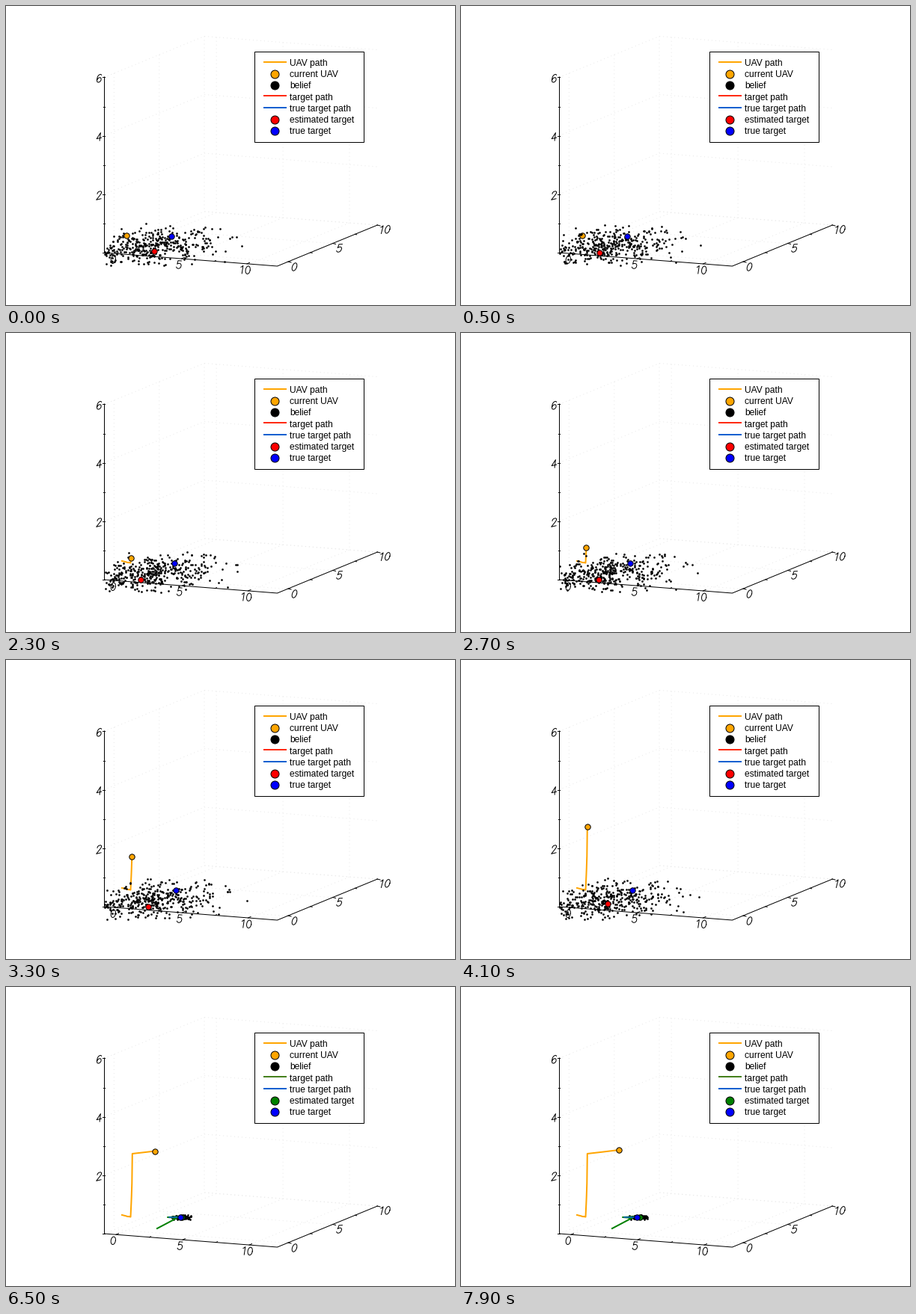
Recreate the animation shown at these times as a matplotlib script. Size 600 px wide and 400 px high, loop 8 s.

```python
import numpy as np
import matplotlib.pyplot as plt
from matplotlib.animation import FuncAnimation
from matplotlib.patches import Rectangle

W, H, DPI = 600, 400, 100
PX = 72 / DPI
LOCK = 25          # step at which the belief collapses
STEPS = 41
COUNT = 430

fig = plt.figure(figsize=(W / DPI, H / DPI), dpi=DPI, facecolor="white")
ax = fig.add_axes([0, 0, 1, 1])
ax.set_xlim(0, W)
ax.set_ylim(H, 0)
ax.axis("off")


def line(xs, ys, color="black", width=1.0, z=2, **kw):
    return ax.plot(xs, ys, color=color, lw=width * PX, zorder=z, **kw)[0]


def dot(x, y, color, size, z):
    return ax.plot([x], [y], "o", ms=size * PX, mfc=color, mec="black",
                   mew=1.0 * PX, zorder=z)[0]


# Single-stroke digits in a box 0.6 wide and 1 high
turn = np.linspace(0, 2 * np.pi, 25)
GLYPHS = {
    "0": (0.3 + 0.29 * np.cos(turn), 0.5 + 0.5 * np.sin(turn)),
    "1": ([0.12, 0.22, 0.36, 0.36], [0.8, 0.86, 1, 0]),
    "2": ([0.03, 0.06, 0.18, 0.42, 0.54, 0.56, 0.48, 0, 0.6],
          [0.76, 0.9, 1, 1, 0.9, 0.74, 0.58, 0, 0]),
    "4": ([0.42, 0.42, 0, 0.62], [0, 1, 0.33, 0.33]),
    "5": ([0.52, 0.1, 0.05, 0.15, 0.32, 0.48, 0.58, 0.56, 0.45, 0.28, 0.1, 0],
          [1, 1, 0.56, 0.64, 0.67, 0.62, 0.46, 0.22, 0.06, 0, 0.04, 0.18]),
    "6": ([0.55, 0.47, 0.32, 0.15, 0.05, 0.03, 0.1, 0.28, 0.46, 0.57, 0.56,
           0.44, 0.28, 0.12, 0.04],
          [0.87, 0.97, 1, 0.92, 0.72, 0.35, 0.1, 0, 0.05, 0.2, 0.42,
           0.58, 0.6, 0.52, 0.35]),
}


def stroke(text, cx, cy, u, v, size=10.5):
    """Outline of a number centred at cx, cy on the skewed axes u, v."""
    xs, ys = [], []
    for i, c in enumerate(text):
        gx = np.array(GLYPHS[c][0]) + (i - (len(text) - 1) / 2) * 0.74 - 0.3
        gy = np.array(GLYPHS[c][1]) - 0.5
        xs += [*(cx + size * (gx * u[0] + gy * v[0])), np.nan]
        ys += [*(cy + size * (gx * u[1] + gy * v[1])), np.nan]
    return xs, ys


def draw_grid():
    def rule(*pts):
        line(*zip(*pts), color="#e9e9e9", z=0, linestyle=(0, (1, 4)))

    for y in (330, 252, 173.5, 95.5):
        rule((131, y), (265, y - 55), (496, y - 37))
    for p in (0.1, 0.55, 1):
        x, y = 131 + 134 * p, 330 - 55 * p
        rule((x, y - 234.5), (x, y), (x + 231, y + 18))
    for p in (0.07, 0.455, 0.84):
        x, y = 265 + 231 * p, 275 + 18 * p
        rule((x, y - 234.5), (x, y), (x - 134, y + 55))


def draw_axes():
    line([131.5, 131.5, 362.5, 496.5], [95, 330, 348, 293])
    for v in range(7):
        y = 330 - 39.1 * v
        line([128.5 if v % 2 == 0 else 129.5, 131.5], [y, y])
        if v in (2, 4, 6):
            line(*stroke(str(v), 124.5, y + 1.5, (1, -0.25), (0.12, -1)))
    for v in (0, 2.5, 5, 7.5, 10):
        x, y = 377 + 11.9 * v, 342 - 4.9 * v
        reach = 1 if v % 5 == 0 else 0.6
        line([x, x + 4 * reach], [y, y + 1 * reach])
        if v % 5 == 0:
            line(*stroke(str(v), x + 8.5 + 0.15 * v, y + 7 - 0.1 * v,
                         (1, -0.05), (0.25, -1)))


def draw_legend():
    ax.add_patch(Rectangle((331.5, 60.5), 146, 121, fc="white", ec="black",
                           lw=PX, zorder=20))
    rows = [("UAV path", "#ffa500", 0), ("current UAV", "#ffa500", 1),
            ("belief", "black", 1), ("target path", "#ff2a0a", 0),
            ("true target path", "#0a60d0", 0),
            ("estimated target", "red", 1), ("true target", "blue", 1)]
    keys = []
    for i, (name, color, round_key) in enumerate(rows):
        y = 75.2 + 15.25 * i
        if round_key:
            keys.append(dot(358.5, y + 0.2, color, 11, 21))
        else:
            keys.append(line([345, 374], [y - 0.6] * 2, color, 2, 21))
        ax.text(379, y + 4.6, name, family="Liberation Sans", size=12 * PX,
                va="baseline", zorder=21)
    return keys[3], keys[5]


draw_grid()
draw_axes()
path_key, guess_key = draw_legend()

X_VALUES = (0, 2.5, 5, 7.5, 10)
x_ticks = [line([], []) for _ in X_VALUES]
x_labels = {v: line([], []) for v in X_VALUES[::2]}

uav_path = line([], [], "#ffa500", 2, 3)
uav = dot(0, 0, "#ffa500", 7.4, 4)
belief, = ax.plot([], [], "o", color="black", ms=2.7 * PX, mew=0, zorder=5)
guess_path = line([], [], "#008000", 2, 6)
true_path = line([], [], "#0a60d0", 1.5, 7)
guess = dot(0, 0, "red", 7.4, 8)
true = dot(0, 0, "blue", 7.4, 9)

# Tracks by step
t = np.arange(STEPS)
uav_t = [0, 3, 7, 9, 12, 14.5, 17, 21, 27, 40]
uav_x = np.interp(t, uav_t, [161, 162, 165, 166.5, 166.8, 167.6, 168.3,
                             168.8, 188, 211])
uav_y = np.interp(t, uav_t, [306.5, 307, 307.2, 307.6, 301, 284, 262.5,
                             223, 220.8, 218])
true_x = 221 + 0.36 * t
guess_t = [0, 1, 3, 5, 7, 9, 12, 17, 20, 24, 25, 26, 27, 40]
guess_x = np.interp(t, guess_t, [198, 190, 184.5, 189, 187.5, 184, 180,
                                 190, 194, 202, 228.5, 216, 231, 239])
guess_y = np.interp(t, guess_t, [328, 329, 330, 329, 329.3, 330, 329.5,
                                 330, 327, 323, 309, 308, 307.3, 308])

# Belief cloud
rng = np.random.default_rng(7)
base_x = rng.normal(197, 47, COUNT)
base_y = 323 - 0.11 * (base_x - 197) + rng.normal(0, 12, COUNT)
phase = rng.uniform(0, 2 * np.pi, (2, COUNT))
rate = rng.uniform(0.15, 0.5, COUNT)
tight = rng.normal(0, 1, (2, 130))


def cloud(s):
    noise = np.random.default_rng(100 + s)
    if s >= LOCK:
        jitter = noise.normal(0, 0.35, tight.shape)
        dx, dy = np.clip(tight + jitter, -2.4, 2.4)
        cx = np.interp(s, [LOCK, 27, 40], [230, 231.5, 237])
        return cx + 5.2 * dx, 308 + 1.2 * dy - 0.05 * dx
    x = base_x + 7 * np.sin(phase[0] + rate * s) + noise.normal(0, 1.5, COUNT)
    y = base_y + 3 * np.sin(phase[1] + rate * s) + noise.normal(0, 0.8, COUNT)
    keep = (x > 131.5) & (y < 347) & (y > 291) & (x < 334)
    return x[keep], y[keep]


def place_x_axis(s):
    squeeze = 0.3 if s == 0 else 0.15 if s < LOCK else 0
    for v, tick in zip(X_VALUES, x_ticks):
        x = 147 + (17.8 - squeeze) * v
        y = 330 + (x - 131) * 18 / 231
        reach = 1 if v % 5 == 0 else 0.6
        tick.set_data([x, x + 3.5 * reach], [y, y - 1.5 * reach])
        if v in x_labels:
            x_labels[v].set_data(*stroke(str(v), x - 3.7 + 0.1 * v, y + 8,
                                         (1, 0.08), (0.15, -1)))


def update(i):
    s = (i + 1) // 2
    locked = s >= LOCK
    place_x_axis(s)

    xs, ys = list(uav_x[:s + 1]), list(uav_y[:s + 1])
    if s >= 4:
        xs, ys = [155] + xs, [305] + ys
    uav_path.set_data(xs, ys)
    uav.set_data([uav_x[s]], [uav_y[s]])

    belief.set_data(*cloud(s))
    if locked:
        guess_path.set_data(guess_x[LOCK - 1:s + 1], guess_y[LOCK - 1:s + 1])
        true_path.set_data([218, true_x[s]], [307.8, 307.8])
    else:
        guess_path.set_data([], [])
        true_path.set_data([], [])
    guess.set_data([guess_x[s]], [guess_y[s]])
    true.set_data([true_x[s]], [307.6 + 0.02 * s])

    for mark in (guess, guess_key):
        mark.set_markerfacecolor("#008000" if locked else "red")
    path_key.set_color("#46801c" if locked else "#ff2a0a")
    return []


anim = FuncAnimation(fig, update, frames=80, interval=100, repeat=True,
                     repeat_delay=0, blit=False)
plt.show()
```
